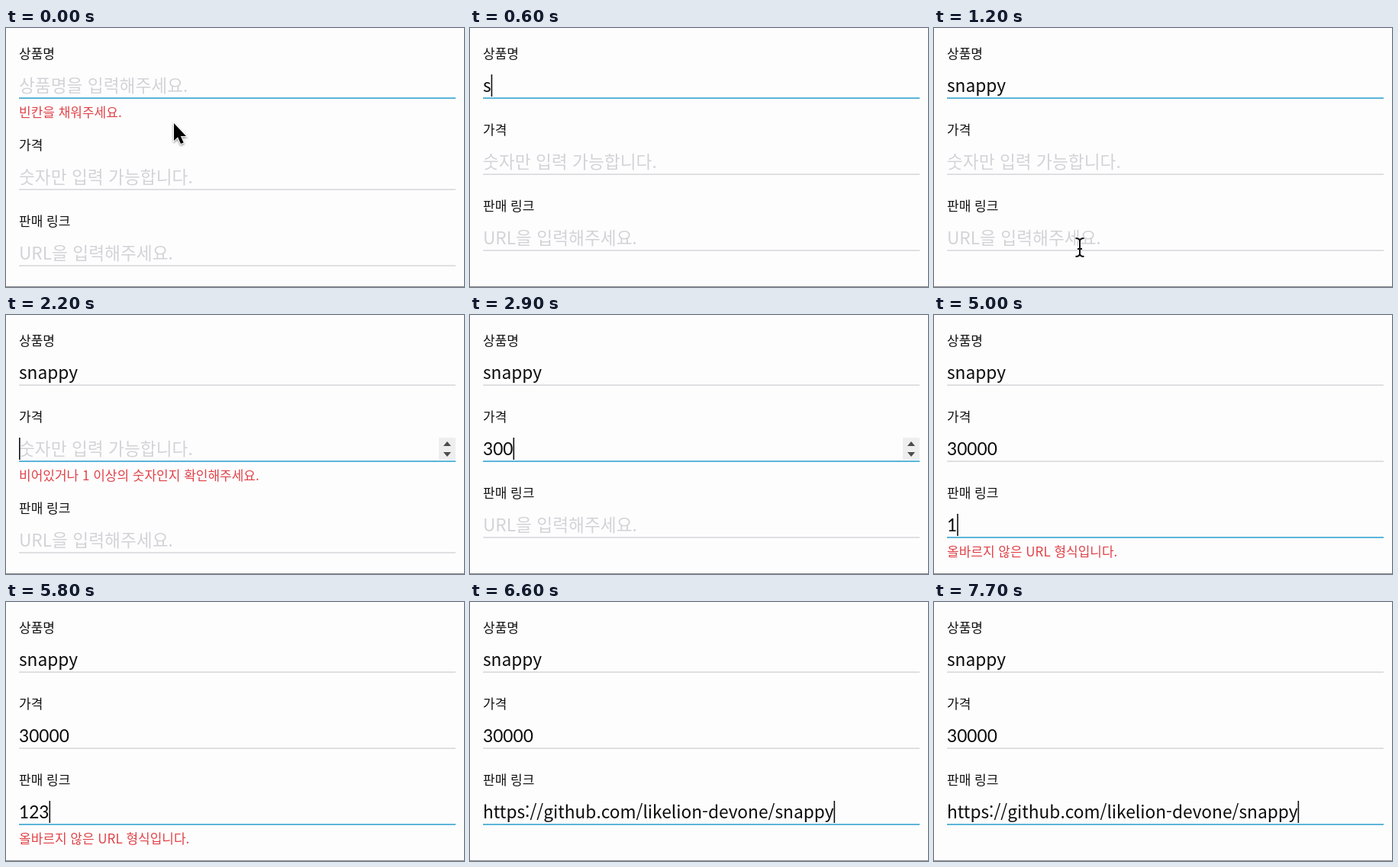
An HTML page with a canvas that plays this animation: 600 px wide and 340 px high, repeating every 7.9 s.

```html
<!DOCTYPE html>
<html lang="ko">
<head>
<meta charset="utf-8">
<title>Form validation</title>
<style>
html, body { margin: 0; width: 100%; height: 100%; overflow: hidden; background: #fefdfe; }
svg, canvas { position: absolute; left: 0; top: 0; }
text { font-family: "Noto Sans CJK KR", "Noto Sans CJK", sans-serif; white-space: pre; }
.label { font-size: 17px; font-weight: 500; fill: #111; }
.value { font-size: 22.7px; fill: #0b0b0b; }
.value.digits { font-family: Lato, sans-serif; }
.value.hint { font-family: "Noto Sans CJK KR", "Noto Sans CJK", sans-serif; fill: #d3d3d7; }
.error { font-size: 17px; fill: #df4247; }
</style>
</head>
<body>
<svg id="form" width="600" height="340"></svg>
<canvas id="shapes" width="600" height="340"></canvas>
<script>
const LOOP = 7900, LEFT = 17, RIGHT = 589;
const EMPTY = '빈칸을 채워주세요.';
const NOT_NUMBER = '비어있거나 1 이상의 숫자인지 확인해주세요.';
const NOT_URL = '올바르지 않은 URL 형식입니다.';
const LINK = 'https://github.com/likelion-devone/snappy';

// Each list holds [start ms, value...] steps.
const fields = [
  { label: '상품명', hint: '상품명을 입력해주세요.',
    value: [[0, ''], [600, 's'], [700, 'sn'], [800, 'sna'], [900, 'snap'], [1000, 'snappy']],
    error: [[0, EMPTY], [600, '']] },
  { label: '가격', hint: '숫자만 입력 가능합니다.', number: true,
    value: [[0, ''], [2800, '3'], [2900, '300'], [3000, '3000'], [3100, '30000']],
    error: [[0, ''], [1600, NOT_NUMBER], [2800, '']] },
  { label: '판매 링크', hint: 'URL을 입력해주세요.',
    value: [[0, ''], [5000, '1'], [5100, '12'], [5200, '123'],
            [6100, '12'], [6200, '1'], [6300, ''], [6600, LINK]],
    error: [[0, ''], [3700, EMPTY], [5000, NOT_URL], [6300, EMPTY], [6600, '']] }
];
const focus = [[0, 0], [1600, 1], [3700, 2]];
const caretFlips = [300, 1200, 1500, 1900, 2200, 2400, 2600, 3300, 3500, 4000, 4300,
                    4500, 4800, 5500, 5800, 6000, 6100, 6900, 7100, 7400, 7700];
const pointer = [
  [0, 'arrow', 220, 125], [100, 'arrow', 218, 155], [200, 'beam', 213, 198],
  [300, 'arrow', 208, 233], [600, 'none'],
  [1200, 'beam', 191, 288], [1300, 'beam', 190, 266], [1400, 'arrow', 188, 212],
  [1500, 'beam', 186, 178], [1700, 'beam', 187, 182], [1800, 'arrow', 190, 228],
  [1900, 'beam', 196, 292], [2000, 'beam', 202, 300], [2100, 'beam', 204, 302], [2200, 'none'],
  [3500, 'arrow', 199, 302], [3600, 'beam', 195, 290], [3800, 'beam', 193, 288],
  [4200, 'beam', 194, 287], [4500, 'beam', 195, 282], [4600, 'beam', 196, 275],
  [4700, 'beam', 196, 271], [4800, 'beam', 195, 270], [5000, 'none']
];

const form = document.getElementById('form');
const ctx = document.getElementById('shapes').getContext('2d');

function stepAt(list, t) {
  let found = list[0];
  for (const step of list) if (step[0] <= t) found = step;
  return found;
}

function addText(kind) {
  const el = document.createElementNS('http://www.w3.org/2000/svg', 'text');
  el.setAttribute('class', kind);
  el.setAttribute('x', LEFT);
  form.appendChild(el);
  return el;
}

function put(el, text, y) {
  if (el.textContent !== text) el.textContent = text;
  el.setAttribute('y', y);
}

for (const f of fields) {
  f.labelEl = addText('label');
  f.valueEl = addText('value');
  f.errorEl = addText('error');
}

function rect(color, x, y, w, h) {
  ctx.fillStyle = color;
  ctx.fillRect(x, y, w, h);
}

function polygon(color, points) {
  ctx.beginPath();
  for (const [x, y] of points) ctx.lineTo(x, y);
  ctx.closePath();
  ctx.fillStyle = color;
  ctx.fill();
}

function spinner(top) {
  rect('#eeeeef', 567, top + 61, 22, 29);
  polygon('#4c4c4c', [[573, top + 72], [578, top + 66], [583, top + 72]]);
  polygon('#4c4c4c', [[573, top + 80], [578, top + 86], [583, top + 80]]);
}

function arrow(x, y) {
  ctx.save();
  ctx.translate(x, y);
  ctx.shadowColor = 'rgba(0,0,0,.35)';
  ctx.shadowBlur = 3;
  ctx.shadowOffsetY = 1.5;
  const shape = [[0, 0], [0, 23], [5, 18.3], [9, 27], [12.7, 25.4], [8.9, 17], [16, 17]];
  polygon('#fff', shape);
  ctx.strokeStyle = '#fff';
  ctx.lineWidth = 2;
  ctx.stroke();
  ctx.shadowColor = 'transparent';
  polygon('#000', shape);
  ctx.restore();
}

function beam(x, y) {
  ctx.beginPath();
  for (const s of [-1, 1]) {
    ctx.moveTo(x - 5.5, y + s * 12);
    ctx.quadraticCurveTo(x, y + s * 12, x, y + s * 8);
    ctx.quadraticCurveTo(x, y + s * 12, x + 5.5, y + s * 12);
  }
  ctx.moveTo(x, y - 9);
  ctx.lineTo(x, y + 9);
  ctx.moveTo(x - 3, y + 2);
  ctx.lineTo(x + 3, y + 2);
  for (const [color, width] of [['#fff', 4], ['#111', 2]]) {
    ctx.strokeStyle = color;
    ctx.lineWidth = width;
    ctx.stroke();
  }
}

function caretOn(t, typed) {
  // Typing keeps the caret lit; the flips alternate on and off.
  let on = false, since = 0;
  for (const flip of caretFlips) if (flip <= t) { on = !on; since = flip; }
  return on || typed > since;
}

function draw(t) {
  ctx.clearRect(0, 0, 600, 340);
  const active = stepAt(focus, t)[1];
  let top = 0;
  fields.forEach((f, i) => {
    const [typed, value] = stepAt(f.value, t);
    const error = stepAt(f.error, t)[1];
    const digits = /^\d+$/.test(value);
    put(f.labelEl, f.label, top + 40);
    f.valueEl.setAttribute('class', 'value' + (value ? digits ? ' digits' : '' : ' hint'));
    put(f.valueEl, value || f.hint, top + 84);
    put(f.errorEl, error, top + 117);
    if (i === active) {
      rect('#40a9d3', LEFT, top + 91.2, RIGHT - LEFT, 1.7);
      if (f.number) spinner(top);
      const lit = caretOn(t, typed) || (i > 0 && t - stepAt(focus, t)[0] < 300);
      const width = value ? f.valueEl.getComputedTextLength() : 0;
      if (lit) rect('#111', LEFT + width, top + 161 - 100, 1.6, 29);
    } else {
      rect('#cfcfd3', LEFT, top + 91.4, RIGHT - LEFT, 1.3);
    }
    top += error && i < 2 ? 120 : 100;
  });
  rect('#8c8c8c', 0, 339, 600, 1);
  const [, kind, x, y] = stepAt(pointer, t);
  if (kind === 'arrow') arrow(x, y);
  if (kind === 'beam') beam(x, y);
}

const start = performance.now();
function tick() {
  const t = (performance.now() - start) % LOOP;
  draw(Math.floor(t / 100) * 100);
  requestAnimationFrame(tick);
}
draw(0);
requestAnimationFrame(tick);
</script>
</body>
</html>
```
